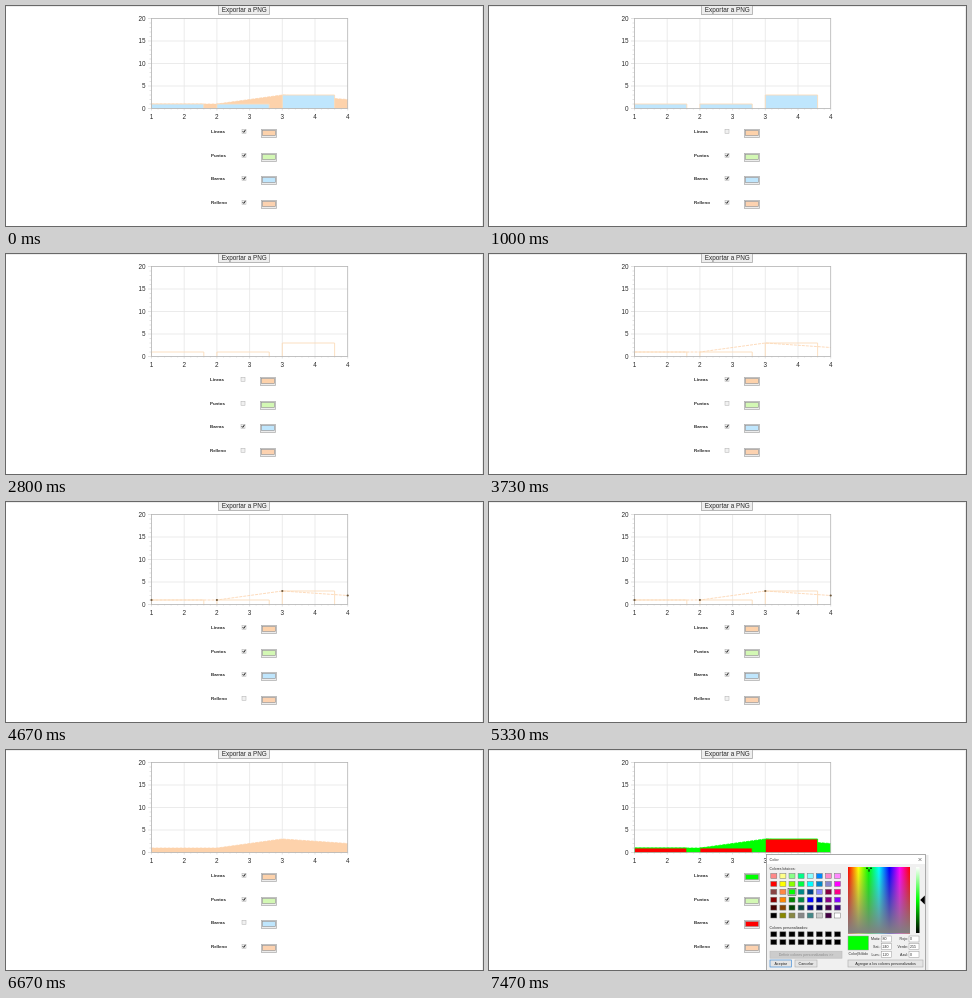
These frames come from a looping animation (477x220 px, 8.39 s). An HTML page:

```html
<!DOCTYPE html>
<html lang="es">
<head>
<meta charset="utf-8">
<title>Opciones de gráfica</title>
<style>
html, body { margin: 0; width: 477px; height: 220px; overflow: hidden; background: #fff; }
svg { display: block; font-family: "Liberation Sans", Arial, sans-serif; fill: #2a2a2a;
  --line: #fdd2ab; --bar: #bfe6fd; --edge: #fbdcba; }
svg, .anim { animation: 8390ms step-end infinite; }
svg { animation-name: recolor; }

/* check marks */
.lines  { animation-name: lines; }
.points { animation-name: points; }
.bars   { animation-name: bars; }
.fills  { animation-name: fills; }
/* layers that depend on several boxes */
.area   { animation-name: area; }
.solid  { animation-name: solid; }
.dots   { animation-name: dots; }
.dialog { animation-name: dialog; }
.legend { animation-name: nudge; }

@keyframes lines  { 0%, 44.45% { opacity: 1 } 11.08% { opacity: 0 } }
@keyframes points { 0%, 55.66%, 77.83% { opacity: 1 } 22.28%, 66.74% { opacity: 0 } }
@keyframes bars   { 0%, 89.03% { opacity: 1 } 77.83% { opacity: 0 } }
@keyframes fills  { 0%, 66.74% { opacity: 1 } 33.37% { opacity: 0 } }
@keyframes area   { 0%, 66.74% { opacity: 1 } 11.08% { opacity: 0 } }
@keyframes solid  { 0%, 66.74%, 89.03% { opacity: 1 } 33.37%, 77.83% { opacity: 0 } }
@keyframes dots   { 0%, 66.74% { opacity: 0 } 55.66% { opacity: 1 } }
@keyframes dialog { 0% { opacity: 0 } 89.03% { opacity: 1 } }
@keyframes nudge  { 0%, 44.45% { transform: none } 22.28% { transform: translate(-1px, 0) } }
@keyframes recolor {
  0% { --line: #fdd2ab; --bar: #bfe6fd; --edge: #fbdcba }
  89.03% { --line: #0f0; --bar: #f00; --edge: #0f0 }
}
.area { fill: var(--line); }
.solid { fill: var(--bar); }
.outline { fill: none; stroke: var(--edge); stroke-width: .9; }
.trend { fill: none; stroke: var(--line); stroke-width: .8; stroke-dasharray: 3 1; }
.dots { fill: #6e573a; }
</style>
</head>
<body>
<svg id="stage" width="477" height="220" viewBox="0 0 477 220">
  <defs>
    <linearGradient id="hue"></linearGradient>
    <linearGradient id="gray" x2="0" y2="1">
      <stop stop-color="#808080" stop-opacity="0"/><stop offset="1" stop-color="#808080"/>
    </linearGradient>
    <linearGradient id="lum" x2="0" y2="1">
      <stop stop-color="#fff"/><stop offset=".5" stop-color="#0f0"/><stop offset="1"/>
    </linearGradient>
  </defs>
  <path d="M0 .5H477M476.5 0V220" stroke="#ededed"/>
  <g id="page"></g>
  <g class="legend anim" id="legend"></g>
  <g class="dialog anim" id="dialog"></g>
</svg>
<script>
const $ = id => document.getElementById(id);
const X = v => 145.5 + (v - 1) * 65.4;
const Y = v => 102.5 - v * 4.5;
const range = (n, f) => Array.from({ length: n }, (_, i) => f(i)).join('');
const rect = (x, y, w, h, fill, attrs = '') =>
  `<rect x="${x}" y="${y}" width="${w}" height="${h}" fill="${fill}" ${attrs}/>`;
const text = (x, y, size, str, attrs = '') =>
  `<text x="${x}" y="${y}" font-size="${size}" ${attrs}>${str}</text>`;
const mid = 'text-anchor="middle"';
const edge = (color, w = .6) => `stroke="${color}" stroke-width="${w}"`;

const data = [[1, 1], [2, 1], [3, 3], [4, 2]];
const trend = data.map(([x, y]) => `${X(x)} ${Y(y)}`).join('L');

function chart() {
  const grid = range(5, i => `M${X(1.5 + i / 2)} ${Y(20)}V${Y(0)}`)
    + range(3, i => `M${X(1)} ${Y(5 + i * 5)}H${X(4)}`);
  const ticks = range(21, i => `M${i % 5 ? 143.5 : 142} ${Y(i)}H${X(1)}`)
    + range(31, i => `M${X(1 + i / 10)} ${Y(0)}v${i % 5 ? 1 : 2}`);
  const bars = data.slice(0, 3)
    .map(([x, y]) => `M${X(x)} ${Y(0)}V${Y(y)}H${X(x + .8)}V${Y(0)}`).join('');
  return `<path d="${grid}" ${edge('#e6e6e6', .8)}/>
    <path d="${ticks}" ${edge('#c4c4c4', .5)}/>
    <path class="area anim" d="M${X(1)} ${Y(0)}L${trend}V${Y(0)}Z"/>
    <g class="lines anim"><path class="trend" d="M${trend}"/></g>
    <path class="solid anim" d="${bars}"/>
    <g class="bars anim"><path class="outline" d="${bars}"/></g>`
    + rect(X(1), Y(20), X(4) - X(1), 90, 'none', edge('#b4b4b4', .8))
    + `<g class="dots anim">${data.map(([x, y]) => `<circle cx="${X(x)}" cy="${Y(y)}" r="1.1"/>`).join('')}</g>`
    + range(5, i => text(139.6, Y(i * 5) + 2.2, 6.4, i * 5, 'text-anchor="end"'))
    + range(7, i => text(X(1 + i / 2), 113, 6.4, Math.round(1 + i / 2), mid));
}

function option([name, cls, color], i) {
  const y = Math.round(126 + i * 23.7);
  return text(205, y + 1.4, 4.4, name, 'font-weight="bold" fill="#222"')
    + rect(236, y - 2.7, 4, 4, '#f0f0f0', edge('#b0b0b0', .5))
    + `<path class="${cls} anim" d="M236.7 ${y - .8}l1.1 1.2 1.6-2.5" fill="none" ${edge('#222', 1)}/>`
    + rect(255.5, y - 2.5, 15, 8, '#ececec', edge('#b4b4b4', .8))
    + `<rect x="256.5" y="${y - 1.5}" width="13" height="5" style="fill:${color}" ${edge('#909090')}/>`;
}

const options = [
  ['Líneas', 'lines', 'var(--line)'],
  ['Puntos', 'points', '#d3f8b4'],
  ['Barras', 'bars', 'var(--bar)'],
  ['Relleno', 'fills', '#fcd2b0'],
];

$('page').innerHTML = rect(212.5, -2, 51, 10.5, '#eee', edge('#aaa', .8))
  + text(238.3, 5.9, 6.4, 'Exportar a PNG', mid)
  + chart();
$('legend').innerHTML = options.map(option).join('');

const basic = ('f88 ff8 8f8 0f8 8ff 08f f8c f8f f00 ff0 8f0 0f4 0ff 08c 88c f0f '
  + '844 f84 0f0 088 048 88f 804 f08 800 f80 080 084 00f 00a 808 80f '
  + '400 840 040 044 008 004 404 408 000 880 884 888 488 ccc 404 fff').split(' ');

const cell = (i, top, fill) =>
  rect(281.8 + i % 8 * 9.1, top + (i >> 3) * 7.9, 6, 5, fill, edge('#777', .5));
const button = (x, y, w, label, border = '#aaa', fill = '#e4e4e4', ink = '#222') =>
  rect(x, y, w, 7, fill, edge(border))
  + text(x + w / 2, y + 4.8, 3.7, label, `${mid} fill="${ink}"`);
const field = (x, y, label, value, gap) => text(x + gap - 1, y + 1.3, 3.6, label, 'text-anchor="end"')
  + rect(x + gap, y - 3, 10, 6, '#fff', edge('#999', .5))
  + text(x + gap + 1, y + 1.3, 3.6, value);

$('hue').innerHTML = range(7, i => `<stop offset="${i / 6}" stop-color="hsl(${i * 60} 100% 50%)"/>`);

$('dialog').innerHTML = rect(277.5, 105, 162, 116, '#000', 'opacity=".08"')
  + rect(277.5, 104.5, 159, 117, '#f0f0f0', edge('#999', .8))
  + rect(278, 105, 158, 9, '#fff')
  + text(280.5, 110.5, 3.9, 'Color')
  + `<path d="M429.5 108l3 3m0-3l-3 3" ${edge('#333', .5)}/>`
  + text(280.5, 120.3, 3.5, 'Colores básicos:')
  + basic.map((c, i) => cell(i, 123.5, '#' + c)).join('')
  + rect(299, 138.3, 8, 7, 'none', edge('#222', .5))
  + text(280.5, 178.8, 3.6, 'Colores personalizados:')
  + range(16, i => cell(i, 181.8, '#000'))
  + button(281, 201.2, 72, 'Definir colores personalizados &gt;&gt;', '#bbb', '#ccc', '#8c8c8c')
  + button(281, 210, 21.5, 'Aceptar', '#2a7fd4')
  + button(306, 210, 22, 'Cancelar')
  + rect(359, 117, 62, 66.5, 'url(#hue)') + rect(359, 117, 62, 66.5, 'url(#gray)')
  + `<path d="M377 118.2h2m2 0h2M380 119.2v2.5" ${edge('#000', 1)}/>`
  + rect(427, 117, 3.5, 66, 'url(#lum)')
  + '<path d="M431.2 150l4.6-4.5v9z" fill="#000"/>'
  + rect(359, 186, 20.5, 14, '#0f0', edge('#999', .5))
  + text(359.5, 204.5, 3.6, 'Color|Sólido')
  + [['Matiz:', 80, 'Rojo:', 0], ['Sat.:', 240, 'Verde:', 255], ['Lum.:', 120, 'Azul:', 0]]
    .map(([a, v, b, w], i) => field(381, 189 + i * 7.7, a, v, 11.5) + field(404, 189 + i * 7.7, b, w, 16)).join('')
  + button(359, 210, 75, 'Agregar a los colores personalizados');
</script>
</body>
</html>
```
